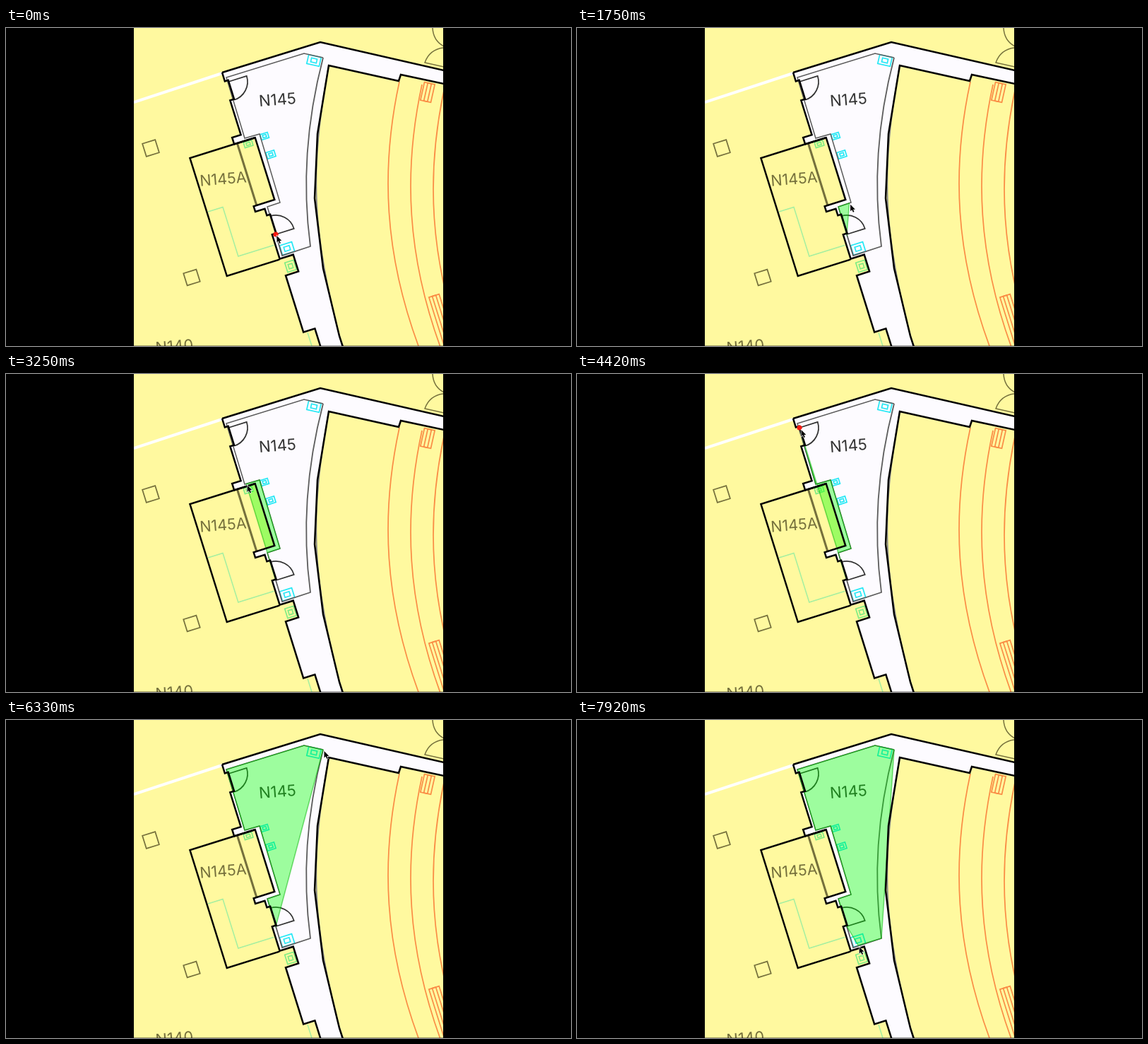
Write an HTML page with a canvas that moves like this. It is 800 by 450 pixels and loops after 8000 ms.

```html
<!DOCTYPE html>
<html>
<head>
<meta charset="utf-8">
<style>
html, body { margin: 0; width: 100%; height: 100%; overflow: hidden; background: #000; }
canvas { display: block; }
</style>
</head>
<body>
<canvas id="stage" width="800" height="450"></canvas>
<script>
const ctx = document.getElementById('stage').getContext('2d');
const LOOP = 8000, DWELL = 250, SNAP = 4;
const TILT = 17.4 * Math.PI / 180;   // the building stands at this angle
const YELLOW = '#fff99f', WHITE = '#fdfbff', OLIVE = '#75703c', GRAY = '#5c5c5c',
      ORANGE = '#fa8c45', CYAN = '#25e8f5', MINT = '#a5efa0', LIME = '#80ec85';

// Pointer stops; each one adds a corner unless it only hovers.
const stop = (time, x, y, hover = false) => ({ time, x, y, hover });
const route = [
  stop(0, 382, 292), stop(1000, 370, 253), stop(1900, 388, 247), stop(2800, 359, 150),
  stop(3300, 338, 156), stop(4300, 316, 77, true), stop(4750, 312, 70), stop(5670, 422, 36),
  stop(6100, 449, 42), stop(7050, 441, 310, true), stop(7500, 431, 309), stop(LOOP, 388, 322)
];
const corners = route.filter(s => !s.hover);
const hinges = [{ x: 382, y: 292 }, { x: 315, y: 76 }];

const line = points => 'M' + points.map(p => `${p.x} ${p.y}`).join('L');

// Walks from a point, alternately down and across the building's own grid.
function walk(x, y, ...lengths) {
  const points = [{ x, y }];
  lengths.forEach((length, i) => {
    const angle = i % 2 ? -TILT : Math.PI / 2 - TILT;
    x += length * Math.cos(angle);
    y += length * Math.sin(angle);
    points.push({ x, y });
  });
  return line(points);
}

function stroke(d, color, width = 1.5) {
  ctx.strokeStyle = color;
  ctx.lineWidth = width;
  ctx.stroke(new Path2D(d));
}

function fill(d, color) {
  ctx.fillStyle = color;
  ctx.fill(new Path2D(d));
}

function placed(x, y, angle, draw) {
  ctx.save();
  ctx.translate(x, y);
  ctx.rotate(angle);
  draw();
  ctx.restore();
}

// Rectangle around its centre, with an optional smaller one inside.
function box(x, y, w, h, color, { angle = -TILT, innerW = 0, innerH = 0 } = {}) {
  placed(x, y, angle, () => {
    ctx.strokeStyle = color;
    ctx.lineWidth = 1.7;
    ctx.strokeRect(-w / 2, -h / 2, w, h);
    if (innerW) ctx.strokeRect(-w * innerW / 2, -h * innerH / 2, w * innerW, h * innerH);
  });
}

function door(hinge, turn) {
  ctx.strokeStyle = '#333';
  ctx.lineWidth = 1.7;
  ctx.beginPath();
  ctx.moveTo(hinge.x, hinge.y);
  ctx.arc(hinge.x, hinge.y, 27, -TILT, turn - TILT, turn < 0);
  ctx.stroke();
}

function label(text, x, y, size, color) {
  placed(x, y, -0.08, () => {
    ctx.font = `${size}px Inter, sans-serif`;
    ctx.textAlign = 'center';
    ctx.fillStyle = color;
    ctx.fillText(text, 0, 0);
  });
}

const leftWall = walk(306, 63, 13, 5, 28, -6, 51, -13, 10, 31, 92, -31, 8, 14, 10, 5, 28, -6,
  36, 20, 25, -19, 84, 17, 27);
const rightWall = '477 451L472 436 449 340 437 241 441 150 457 53 556 75 559 66 620 79';
const topWall = '620 60L445 20 306 63';
const roomA = walk(353, 155, 0, -97, 175, 78);

function drawPlan() {
  fill('M181 0H619V450H181Z', YELLOW);
  fill(`${leftWall}L${rightWall}L${topWall}Z`, WHITE);
  stroke('M181 105L306 64', '#fff', 4);

  // Seating rows and steps
  for (let row = 0; row < 3; row++) {
    placed(32 * row, 4 * row, 0, () => stroke('M557 76C530 200 536 320 584 450', ORANGE, 1.7));
  }
  const step = { innerW: 0.35, innerH: 1 };
  box(597, 91, 15, 26, ORANGE, { ...step, angle: 0.22 });
  box(618, 417, 15, 80, ORANGE, step);

  // Columns and outer doors
  box(205, 170, 19, 19, OLIVE);
  box(263, 353, 19, 18, OLIVE);
  stroke('M604 0Q605 18 620 26M620 55L593 49Q600 30 620 28', OLIVE);

  // Furniture
  const nested = { innerW: 0.45, innerH: 0.45 };
  stroke(walk(286, 260, 0, 22, 73, 53), MINT);
  stroke(walk(427, 431, 20), MINT);
  box(343, 164, 12, 8, LIME, nested);
  box(403, 337, 13, 14, LIME, nested);
  box(436, 46, 18, 13, CYAN, { ...nested, angle: 0.22 });
  box(366, 153, 11, 8, CYAN, nested);
  box(375, 179, 12, 9, CYAN, nested);
  box(398, 312, 18, 14, CYAN, nested);

  // Room interior
  stroke(line(corners.slice(0, 8)), GRAY);
  stroke('M449 42C426 130 419 220 431 309L391 322 382 292', GRAY, 1.8);
  stroke('M457 53C430 200 432 290 476 450', '#888', 1.8);
  stroke(walk(327, 162, 94), OLIVE, 3);
  door(hinges[0], -Math.PI / 2);
  door(hinges[1], Math.PI / 2);

  label('N145', 385, 109, 22, '#333');
  label('N145A', 308, 221, 21.5, OLIVE);
  label('N140', 239, 458, 22, OLIVE);
}

function pointerAt(time) {
  const next = route.findIndex(s => s.time > time);
  const from = route[next - 1], to = route[next];
  const leave = from.time + DWELL;
  const u = Math.max(0, (time - leave) / (to.time - leave));
  const eased = u * u * (3 - 2 * u);
  return { x: from.x + (to.x - from.x) * eased, y: from.y + (to.y - from.y) * eased };
}

function drawSelection(time, end) {
  const points = corners.filter(c => c.time <= time);
  const outline = line([...points, end]) + 'Z';
  fill(outline, 'rgba(0,255,0,.38)');
  stroke(outline, 'rgba(0,180,0,.5)');
}

function drawPointer({ x, y }, snapped) {
  if (snapped) {
    ctx.fillStyle = '#f51a10';
    ctx.beginPath();
    ctx.arc(snapped.x, snapped.y, 3.6, 0, 7);
    ctx.fill();
  }
  placed(x + 1.5, y + 2, 0, () => {
    const arrow = 'M0 0V9.5L2.2 7.5 3.8 11 5.4 10.3 3.9 6.9H6.8Z';
    stroke(arrow, '#fff', 1.2);
    fill(arrow, '#000');
  });
}

function render(time) {
  const pointer = pointerAt(time);
  const snapped = hinges.find(h => Math.hypot(h.x - pointer.x, h.y - pointer.y) < SNAP);
  ctx.fillStyle = '#000';
  ctx.fillRect(0, 0, 800, 450);
  ctx.save();
  ctx.beginPath();
  ctx.rect(181, 0, 438, 450);
  ctx.clip();
  drawPlan();
  drawSelection(time, snapped || pointer);
  for (const wall of [leftWall, 'M' + rightWall, 'M' + topWall, roomA]) stroke(wall, '#000', 2.5);
  ctx.fillStyle = 'rgba(0,0,0,.35)';
  ctx.fillRect(181, 449, 438, 1);
  drawPointer(pointer, snapped);
  ctx.restore();
}

const start = performance.now();
function tick() {
  render((performance.now() - start) % LOOP);
  requestAnimationFrame(tick);
}
tick();
</script>
</body>
</html>
```
